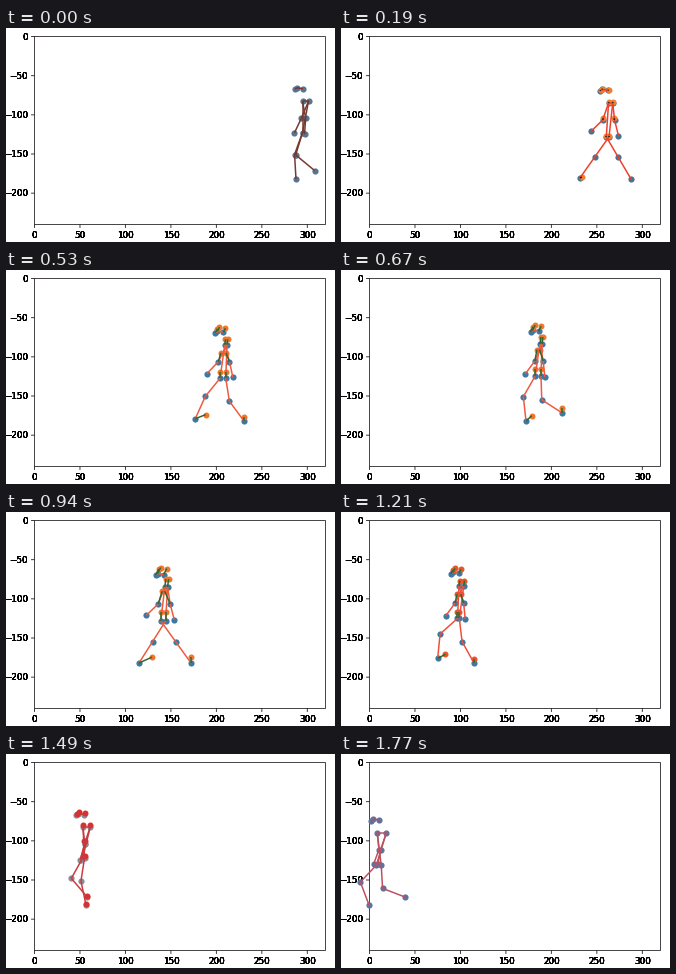
A matplotlib script for the animation above (1840 ms loop, 329 by 214 pixels).

```python
import numpy as np
import matplotlib.pyplot as plt
from matplotlib.animation import FuncAnimation
from matplotlib.collections import LineCollection
from matplotlib.patches import Rectangle

W, H, TICK = 329, 214, 10
LEFT, RIGHT, TOP, BOTTOM = 28.5, 319.5, 8.5, 196.5

# Length of each pose in 10 ms ticks
HOLDS = [5] + [7] * 6 + [6, 7, 7, 6, 7, 7, 7, 6] + [7] * 12
POSE_AT = np.repeat(np.arange(len(HOLDS)), HOLDS)
LAST = len(HOLDS) - 1

# Gait, in poses and pixels
PERIOD, STRIDE = 10.7, 105
CONTACT = 14
THIGH, SHIN = 23.3, 24.5
GROUND = 151

BONES = [("ear", "nose"), ("nose", "eye"), ("shoulder_l", "shoulder_r")]
for side in "lr":
    for chain in (("shoulder", "elbow", "wrist"), ("shoulder", "hip", "knee", "ankle")):
        names = [f"{part}_{side}" for part in chain]
        BONES += zip(names, names[1:])

# First pose of each palette: joint, bone, marker, link
PALETTES = [
    (0, ("#587491", "#75392f", "#b8302a", "#4a302c")),
    (3, ("#4a7290", "#ee3f2c", "#f08030", "#1e1e1c")),
    (8, ("#3b78a3", "#ee5a40", "#f0762a", "#2c692e")),
    (17, ("#3b78a3", "#ee4f3a", "#ea5528", "#2c692e")),
    (20, ("#8c8c98", "#c83a3e", "#dc3030", "#c83a3e")),
    (24, ("#5d73a0", "#bd5060", "#bd5060", "#bd5060")),
]


def foot(n, contact, x):
    """Planted for half a stride, then eased forward to the next plant."""
    steps, phase = divmod((n - contact) / PERIOD, 1)
    s = max(0, 2 * phase - 1)
    ease = s * s * (3 - 2 * s)
    lift = 8.5 * np.sin(np.pi * s ** 0.7)
    return np.array([x - STRIDE * (steps + ease), GROUND - lift])


def knee(hip, ankle):
    """Two-bone joint, bent in the walking direction."""
    leg = ankle - hip
    d = np.hypot(*leg)
    u = leg / d
    along = (d * d + THIGH ** 2 - SHIN ** 2) / (2 * d)
    bend = np.sqrt(max(0, THIGH ** 2 - along ** 2))
    return hip + along * u + bend * np.array([-u[1], u[0]])


def pose(n):
    body = 296.5 - 9.95 * n
    bob = np.cos(4 * np.pi * (n - CONTACT) / PERIOD)
    end = max(0, (n - 22) / (LAST - 22))
    drop = 4.5 * end
    turn = np.cos(np.pi * (n - 10) / 20)
    swing = np.cos(2 * np.pi * (n - CONTACT) / PERIOD) * (1 - 0.8 * end)

    def at(dx, y):
        return np.array([body + dx, y + drop])

    joints = {"ear": at(-7.5, 62 + bob), "nose": at(-5.5, 60.5 + bob),
              "eye": at(0.5, 61.5 + bob)}
    for side, k, contact, x in (("l", 1, CONTACT, 133),
                                ("r", -1, CONTACT - PERIOD / 2, 185)):
        hip = at(3 * k * turn, 106.5 + 2.5 * bob)
        ankle = foot(n, contact, x)
        reach = -3 + 14 * k * swing
        parts = {
            "shoulder": at(3 + k * (3 - 2 * turn), 74 + bob),
            "elbow": at(1 + 6 * k * swing, 91 + bob),
            "wrist": at(reach, 106 + 0.15 * reach),
            "hip": hip, "knee": knee(hip, ankle), "ankle": ankle,
        }
        joints.update({f"{part}_{side}": p for part, p in parts.items()})
    return body, joints


def shift(name, p, body):
    """Full offset of the second marker from its joint."""
    part = name.split("_")[0]
    return {
        "ear": (3, -6), "nose": (3, -6), "eye": (3, -6),
        "shoulder": (1, -8),
        "elbow": (0.8 * (body - p[0]), -13),
        "hip": (0, -9),
        "ankle": (0.55 * max(0, body - p[0]), -6),
    }.get(part, (0, 0))


fig = plt.figure(figsize=(W / 72, H / 72), dpi=72, facecolor="white")
ax = fig.add_axes([0, 0, 1, 1])
ax.set(xlim=(0, W), ylim=(H, 0))
ax.axis("off")


def label(x, y, text, ha):
    # Stacked copies give the heavy, over-printed look
    for _ in range(8):
        ax.text(x, y, text, ha=ha, va="baseline", size=8.7,
                family="DejaVu Sans", color="black")


def tick(xs, ys):
    ax.plot(xs, ys, color="#2a2a2a", lw=0.9, snap=False)


ax.add_patch(Rectangle((LEFT, TOP), RIGHT - LEFT, BOTTOM - TOP,
                       fill=False, ec="#4a464a", lw=1, snap=False))
for v in range(0, 301, 50):
    x = LEFT + v * (RIGHT - LEFT) / 320
    tick([x, x], [BOTTOM, BOTTOM + 3])
    label(x, 209.7, str(v), "center")
for v in range(0, 201, 50):
    y = TOP + v * (BOTTOM - TOP) / 240
    tick([LEFT - 3, LEFT], [y, y])
    label(22, y + 3.2, f"\u2212{v}" if v else "0", "right")

dots, = ax.plot([], [], "o", ms=6.2, mew=0, zorder=3)
markers, = ax.plot([], [], "o", ms=6, mew=0, zorder=3.5)
bones = ax.add_collection(LineCollection([], lw=1.5, zorder=4), autolim=False)
links = ax.add_collection(LineCollection([], lw=1.5, zorder=5), autolim=False)


def draw(i):
    n = POSE_AT[i]
    body, joints = pose(n)
    spread = np.sin(np.pi * n / LAST) ** 2
    pairs = []
    for name, p in joints.items():
        d = spread * np.array(shift(name, p, body))
        if np.hypot(*d) > 0.8:
            pairs.append((p, p + d))

    dots.set_data(*np.array(list(joints.values())).T)
    bones.set_segments([(joints[a], joints[b]) for a, b in BONES])
    links.set_segments(pairs)
    markers.set_data([q[0] for _, q in pairs], [q[1] for _, q in pairs])

    colors = [c for start, c in PALETTES if start <= n][-1]
    for artist, color in zip((dots, bones, markers, links), colors):
        artist.set_color(color)
    return dots, markers, bones, links


anim = FuncAnimation(fig, draw, frames=len(POSE_AT), interval=TICK,
                     repeat=True, repeat_delay=0, blit=False)
plt.show()
```
